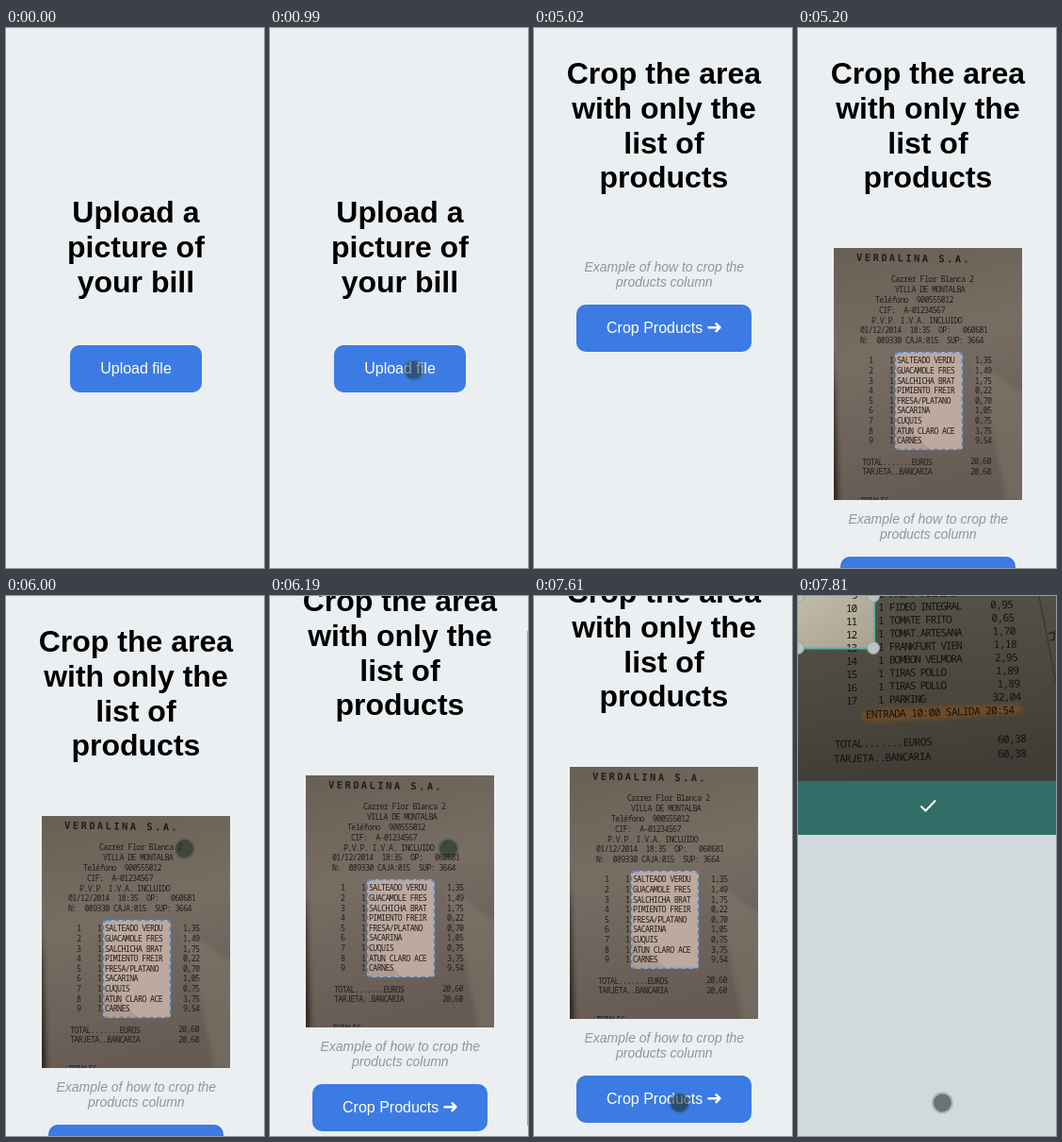
These frames come from a looping animation (274x572 px, 8000 ms). An HTML page:

```html
<!DOCTYPE html>
<html lang="en">
<head>
<meta charset="utf-8">
<title>Upload a bill</title>
<style>
  html, body { margin: 0; width: 100%; height: 100%; overflow: hidden; background: #ebeff2; }
  svg { display: block; width: 274px; height: 572px; }
  text { white-space: pre; font-family: "Liberation Sans", Arial, sans-serif; }
  .title { font-size: 32px; font-weight: bold; text-anchor: middle; }
  .note { font-size: 14px; font-style: italic; text-anchor: middle; fill: #8f9698; }
  .label { font-size: 16px; fill: #fff; }
  .print text { font-family: "Noto Sans Mono", "Liberation Mono", monospace; font-weight: 500; }
  #bill text { font-size: 8.4px; letter-spacing: -.66px; fill: #221c19; }
  #bill .shop { font: bold 10.5px "DejaVu Sans Mono", monospace; letter-spacing: 2.4px; }
  #rows text { font-size: 11.2px; letter-spacing: -1.25px; fill: #11100e; }
  #rows .wide { letter-spacing: -.65px; }
</style>
</head>
<body>
<svg viewBox="0 0 274 572" xmlns="http://www.w3.org/2000/svg">
  <defs>
    <linearGradient id="paper" x1="0" y1="0" x2=".2" y2="1">
      <stop offset="0" stop-color="#686055"/>
      <stop offset=".45" stop-color="#776d63"/>
      <stop offset="1" stop-color="#675c54"/>
    </linearGradient>
    <linearGradient id="dark" x1="0" y1="0" x2=".2" y2="1">
      <stop offset="0" stop-color="#56544a"/>
      <stop offset=".6" stop-color="#4a483e"/>
      <stop offset="1" stop-color="#3f3d35"/>
    </linearGradient>
    <linearGradient id="lit" x1="0" y1="0" x2="1" y2="1">
      <stop offset="0" stop-color="#c1bcaa"/>
      <stop offset="1" stop-color="#a7a18e"/>
    </linearGradient>
    <clipPath id="photoClip"><rect x="38" y="233" width="200" height="267"/></clipPath>
    <clipPath id="shotClip"><rect width="274" height="196"/></clipPath>
    <filter id="soft" x="-20%" y="-20%" width="140%" height="140%"><feGaussianBlur stdDeviation="2.5"/></filter>
  </defs>
  <rect width="274" height="572" fill="#ebeff2"/>

  <g id="upload">
    <g id="uploadTitle"></g>
    <rect x="68" y="336" width="140" height="50" rx="10" fill="#3b7be3"/>
    <text class="label" x="100.2" y="366">Upload file</text>
  </g>

  <g id="guide">
    <g id="guideTitle"></g>
    <g id="photo" clip-path="url(#photoClip)">
      <rect x="38" y="233" width="200" height="267" fill="url(#paper)"/>
      <g filter="url(#soft)">
        <path d="M36 340L39 380L43 502H34Z" fill="#33271f"/>
        <path d="M185 350L242 390V502H222L205 420Z" fill="#8a8075" opacity=".35"/>
      </g>
      <rect x="103" y="343" width="72" height="104" rx="4" fill="#bda99f"/>
      <path d="M104 412L140 446H106Q104 446 104 443Z" fill="#a8958b" opacity=".6"/>
      <g id="bill" class="print"></g>
      <rect x="103.5" y="343.5" width="71" height="103" rx="4" fill="none" stroke="#4a86d4" stroke-width="1.6" stroke-dasharray="4.5 3.5"/>
    </g>
    <g id="below">
      <text class="note" x="138.3" y="258">Example of how to crop the</text>
      <text class="note" x="138.3" y="274">products column</text>
      <rect x="45" y="293" width="186" height="50" rx="10" fill="#3b7be3"/>
      <text class="label" x="77" y="323">Crop Products</text>
      <path d="M184.5 317.2H197M192.8 312.6L197.5 317.2L192.8 321.8" fill="none" stroke="#fff" stroke-width="2.4" stroke-linejoin="round"/>
    </g>
  </g>
  <rect id="thumb" x="273" width="1" height="524" fill="#a4a8aa"/>

  <g id="crop">
    <rect width="274" height="572" fill="#d1d9dc"/>
    <g clip-path="url(#shotClip)">
      <rect width="274" height="196" fill="url(#dark)"/>
      <path d="M256 0L274 92" fill="none" stroke="#3b3931" stroke-width="1.5"/>
      <path d="M266 40l6 -2v8l-4 1" fill="none" stroke="#24221f" stroke-width="1.4"/>
      <path d="M68 123Q72 119 150 117L232 114Q241 117 238 124L150 130L74 133Q66 131 68 123Z" fill="#7a4f22" opacity=".8" filter="url(#soft)"/>
      <rect width="81" height="55" fill="url(#lit)"/>
      <g id="rows" class="print"></g>
      <path d="M0 55.5H81V0" fill="none" stroke="#55b5aa" stroke-width="2"/>
      <g id="grips"></g>
    </g>
    <rect y="196" width="274" height="57" fill="#306e67"/>
    <path d="M130.5 222.5L135.5 227.5L146 216.5" fill="none" stroke="#fff" stroke-width="2"/>
  </g>

  <g id="touch">
    <circle r="10.5" fill="none" stroke="#3c5240" stroke-width="2" stroke-opacity=".25"/>
    <circle id="dot" r="9.6" fill="#1e2c20"/>
  </g>
</svg>
<script>
const LOOP = 8000;
const $ = id => document.getElementById(id);

function add(parent, tag, attrs, content) {
  const el = document.createElementNS('http://www.w3.org/2000/svg', tag);
  for (const key in attrs) el.setAttribute(key, attrs[key]);
  if (content) el.textContent = content;
  return parent.appendChild(el);
}
const print = (parent, x, y, content, more) => add(parent, 'text', { x, y, ...more }, content);

function heading(parent, y, lines) {
  lines.forEach((line, i) => print(parent, 137.9, Math.round(y + i * 36.8), line, { class: 'title' }));
}
heading($('uploadTitle'), 206, ['Upload a', 'picture of', 'your bill']);
heading($('guideTitle'), 59, ['Crop the area', 'with only the', 'list of', 'products']);

// Example bill
const bill = $('bill');
print(bill, 62, 246.5, 'VERDALINA S.A.', { class: 'shop', transform: 'rotate(1 62 246)' });
[
  [99, 'Carrer Flor Blanca 2'],
  [103, 'VILLA DE MONTALBA'],
  [82, 'Teléfono  900555012'],
  [86, 'CIF:  A-01234567'],
  [78, 'P.V.P. I.V.A. INCLUIDO'],
  [66, '01/12/2014  18:35  OP:   060681'],
  [66, 'N:  089330 CAJA:015  SUP: 3664']
].forEach(([x, line], i) => print(bill, x, 269.3 + i * 10.8, line));

const goods = ['SALTEADO VERDU 1,35', 'GUACAMOLE FRES 1,49', 'SALCHICHA BRAT 1,75', 'PIMIENTO FREIR 0,22',
  'FRESA/PLATANO 0,70', 'SACARINA 1,05', 'CUQUIS 0,75', 'ATUN CLARO ACE 3,75', 'CARNES 9,54'];
goods.forEach((item, i) => {
  const y = 355.3 + i * 10.6;
  print(bill, 75, y, String(i + 1));
  print(bill, 97, y, '1');
  print(bill, 105, y, item.slice(0, -5));
  print(bill, 188, y, item.slice(-4));
});
['TOTAL.......EUROS', 'TARJETA..BANCARIA'].forEach((line, i) => {
  print(bill, 68, 462.5 + i * 10.8, line);
  print(bill, 183, 462 + i * 10.8, '20,60');
});
print(bill, 66, 504, 'TOTALES');

// Bill in the crop view
const rows = $('rows');
const shopping = ['PREP. PUCHERO 0,94', 'FIDEO INTEGRAL 0,95', 'TOMATE FRITO 0,65', 'TOMAT.ARTESANA 1,70',
  'FRANKFURT VIEN 1,18', 'BOMBON VELMORA 2,95', 'TIRAS POLLO 1,89', 'TIRAS POLLO 1,89', 'PARKING 32,04'];
const tilt = (x, y, deg) => ({ transform: `rotate(${deg} ${x} ${y})` });
const wide = (x, y, content, deg) => print(rows, x, y, content, { class: 'wide', ...tilt(x, y, deg) });
shopping.forEach((item, i) => {
  const y = 3 + i * 13.95, [, name, price] = item.match(/(.+) (.+)/);
  const end = 227 + i * 1.2;
  print(rows, i ? 51 : 57, y, String(i + 9));
  print(rows, 85, y - 1, '1');
  print(rows, 97, y - 1.2, name, tilt(97, y, -1));
  wide(end - price.length * 6, y - 3.6, price, -1);
});
wide(72, 129.5, 'ENTRADA 10:00 SALIDA 20:54', -1.8);
['TOTAL.......EUROS', 'TARJETA..BANCARIA'].forEach((line, i) => {
  const y = 161 + i * 15.5;
  wide(39 - i, y, line, -1.6);
  wide(212, y - 5.2, '60,38', -1.6);
});
for (const cx of [0, 80]) for (const cy of [0, 55])
  add($('grips'), 'circle', { cx, cy, r: 6.5, fill: '#b9c4c1', stroke: '#8f9c99', 'stroke-width': 1 });

// time, x, y, pressed; a lone time hides the pointer
const pointer = [
  [0], [590, 162.5, 424.5, 0], [790, 152.5, 386.5, 0], [990, 152.5, 362.5, 0], [1590, 152, 362, 1],
  [1790, 163.5, 369.5, 0], [1990], [5590, 245, 312.5, 0], [5790, 196.5, 272.5, 1], [6000, 189.5, 267.7, 1],
  [6390, 170, 415.5, 0], [6610, 155.5, 512, 0], [6790, 155.5, 521.5, 0], [7010, 155.5, 527.5, 0],
  [7200, 155.5, 536.5, 0], [7610, 154.5, 537, 1], [7810, 153.3, 536.8, 1]
];
const scroll = [[0, 0], [6190, 43], [6390, 52]];
const at = (steps, t) => steps.filter(s => s[0] <= t).pop();
const show = (id, on) => $(id).setAttribute('display', on ? 'inline' : 'none');
const move = (id, x, y) => $(id).setAttribute('transform', `translate(${x} ${y})`);

function draw(t) {
  const loaded = t >= 5200, top = at(scroll, t)[1];
  show('upload', t < 5020);
  show('guide', t >= 5020 && t < 7810);
  show('photo', loaded);
  show('crop', t >= 7810);
  show('thumb', t >= 6190 && t < 6790);
  move('guide', 0, -top);
  move('below', 0, loaded ? 267 : 0);
  $('thumb').setAttribute('y', top - 6);

  const [, x, y, pressed] = at(pointer, t);
  show('touch', x !== undefined);
  if (x !== undefined) {
    move('touch', x, y);
    $('dot').setAttribute('fill-opacity', pressed ? .58 : .48);
  }
}

const start = performance.now();
function tick() {
  draw((performance.now() - start) % LOOP);
  requestAnimationFrame(tick);
}
tick();
</script>
</body>
</html>
```
